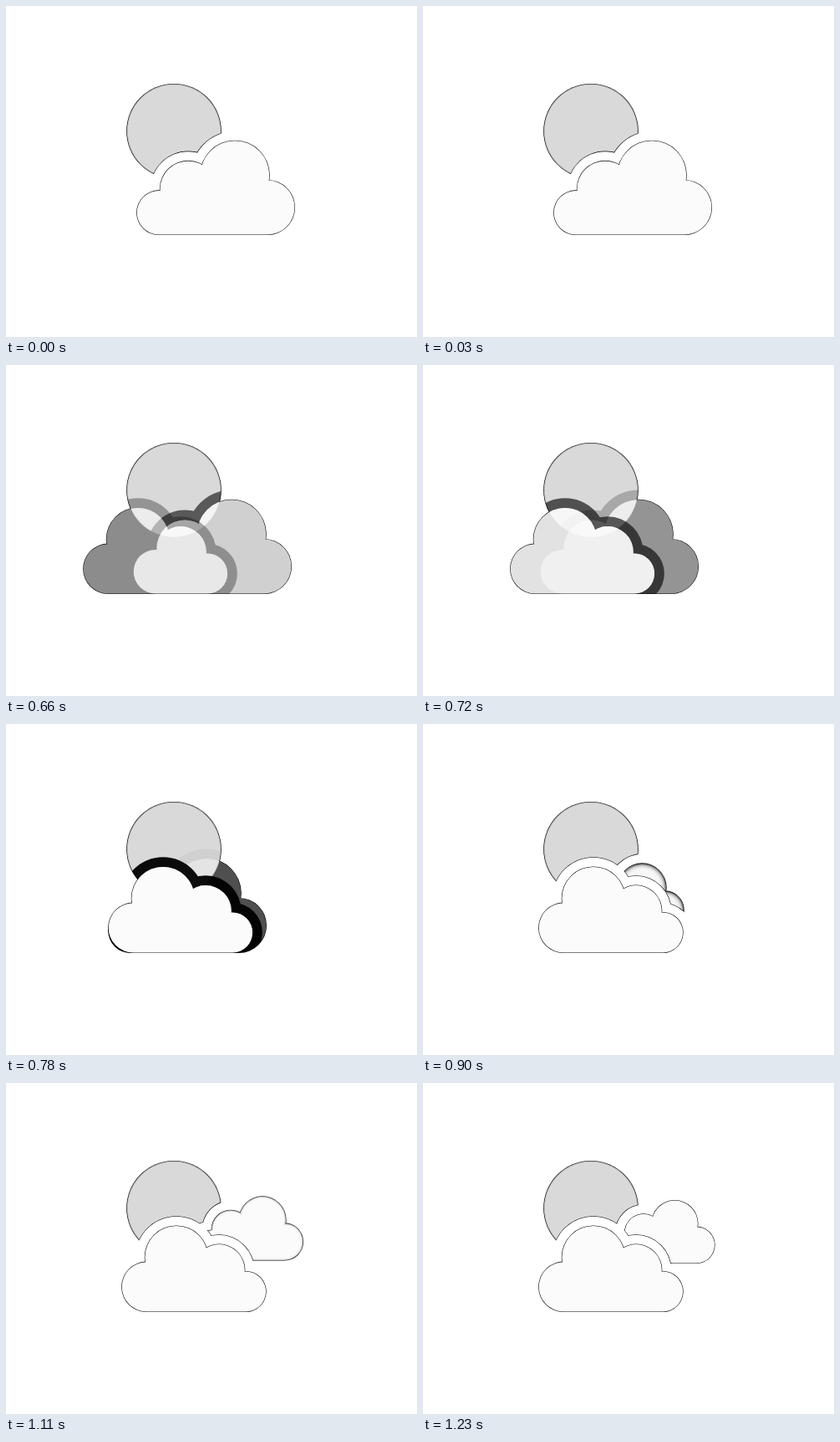
Recreate the animation shown at these times as an HTML page with a canvas. Size 492 by 396 pixels, loop 1.5 s.

```html
<!DOCTYPE html>
<html lang="en">
<head>
<meta charset="utf-8">
<title>Clouds passing the sun</title>
<style>
  html, body { margin: 0; width: 100%; height: 100%; overflow: hidden; background: #fff; }
  canvas { display: block; width: 100vw; height: 100vh; }
</style>
</head>
<body>
<canvas id="stage" width="492" height="396"></canvas>
<script>
const W = 492, H = 396, LOOP = 1500, STEP = 30;
const SUN = { x: 201, y: 149.7, r: 56.2 };
const HALO = 11.8;

// Lobes as x from the cloud's middle, height above its base, radius.
const LOBES = [[-68, 26.3, 26.3], [-33, 54.5, 33.6], [23, 71, 41.3], [62, 32.5, 32.5]];

const newLayer = () => {
  const c = document.createElement('canvas');
  c.width = W;
  c.height = H;
  return c.getContext('2d');
};
const stage = document.getElementById('stage').getContext('2d');
const paint = newLayer();    // light, partly transparent shapes
const backing = newLayer();  // black silhouettes behind them
const scratch = newLayer();

const clamp = v => Math.max(0, Math.min(1, v));
const easeInOut = u => u < 0.5 ? 2 * u * u : 1 - 2 * (1 - u) ** 2;
const easeOutBack = u => 1 + 2.70158 * (u - 1) ** 3 + 1.70158 * (u - 1) ** 2;

function cloudPath({ x, base, size, flip = 1 }, grow = 0) {
  const path = new Path2D();
  const px = dx => x + dx * size * flip;
  for (const [dx, up, r] of LOBES) {
    const radius = r * size + grow;
    path.moveTo(px(dx) + radius, base - up * size);
    path.arc(px(dx), base - up * size, radius, 0, 2 * Math.PI);
  }
  const left = Math.min(px(-68), px(62));
  const top = base - 52 * size;
  path.rect(left, top, 130 * size, base + grow - top);
  return path;
}

function sunPath(grow = 0) {
  const path = new Path2D();
  path.arc(SUN.x, SUN.y, SUN.r + grow, 0, 2 * Math.PI);
  return path;
}

function fill(ctx, path, color, alpha = 1, mode = 'source-over') {
  ctx.globalCompositeOperation = mode;
  ctx.globalAlpha = alpha;
  ctx.fillStyle = color;
  ctx.fill(path);
  ctx.globalAlpha = 1;
  ctx.globalCompositeOperation = 'source-over';
}

const erase = (ctx, path) => fill(ctx, path, '#000', 1, 'destination-out');

function cutHalo(cloud) {
  if (cloud.cut >= 1) {
    erase(paint, cloudPath(cloud, HALO));
    erase(backing, cloudPath(cloud, HALO - 0.6));
    return;
  }
  // A partial cut dims only the ring around the cloud.
  scratch.clearRect(0, 0, W, H);
  fill(scratch, cloudPath(cloud, HALO), '#000');
  erase(scratch, cloudPath(cloud));
  paint.globalCompositeOperation = 'destination-out';
  paint.globalAlpha = cloud.cut;
  paint.drawImage(scratch.canvas, 0, 0);
  paint.globalAlpha = 1;
  paint.globalCompositeOperation = 'source-over';
}

function drawCloud(cloud) {
  const { alpha = 1, soft = 0 } = cloud;
  cutHalo(cloud);
  fill(backing, cloudPath(cloud, 0.55), '#000');
  if (!soft) return fill(paint, cloudPath(cloud), '#fbfbfb', alpha);
  for (let inset = 0; inset < 8; inset++) {
    fill(paint, cloudPath(cloud, -inset), '#fbfbfb', 1 - 0.65 * soft);
  }
}

function cloudsAt(t) {
  const list = [];
  const since = t - 600;
  const slide = 50 * easeInOut(clamp(since / 300));

  if (t >= 870) {
    const u = clamp((t - 870) / 360);
    const away = 1 - easeOutBack(u);
    const soft = 1 - u;
    const size = 0.667 * (1 + 0.05 * soft);
    list.push({
      x: 286 - 61 * away,
      base: 215.5 + 44 * away + 1.2 * soft,
      size, soft, cut: 1
    });
  }

  const fade = since > 0 ? 1 - 0.17 * (since / 60) ** 1.27 : 1;
  if (fade > 0) {
    list.push({ x: 251 - slide, base: 273.5, size: 1, alpha: fade, cut: fade ** 2.8 });
  }

  if (since > 0) {
    list.push({
      x: 175 + slide, base: 273.5, size: 0.913, flip: -1,
      alpha: 1 - (1 - clamp(since / 165)) ** 1.8,
      cut: clamp(since / 190)
    });
  }
  return list;
}

function draw(t) {
  paint.clearRect(0, 0, W, H);
  backing.clearRect(0, 0, W, H);
  fill(backing, sunPath(0.6), '#000');
  fill(paint, sunPath(), '#bdbdbd');
  fill(paint, sunPath(-1), '#d9d9d9');
  cloudsAt(t).forEach(drawCloud);

  stage.fillStyle = '#fff';
  stage.fillRect(0, 0, W, H);
  stage.drawImage(backing.canvas, 0, 0);
  stage.drawImage(paint.canvas, 0, 0);
}

const start = performance.now();
function tick() {
  const t = (performance.now() - start) % LOOP;
  draw(Math.floor(t / STEP) * STEP);
  requestAnimationFrame(tick);
}
tick();
</script>
</body>
</html>
```
